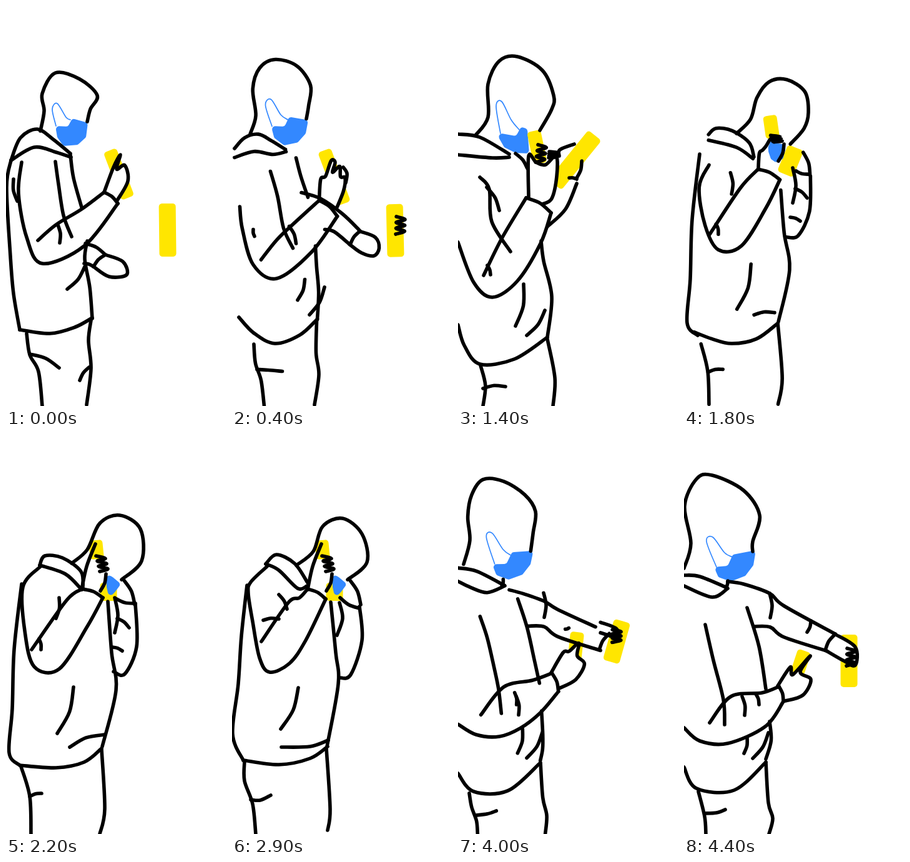
Animation of 352x640 px, one loop 4500 ms. Source, as an HTML page with a canvas:

```html
<!DOCTYPE html>
<html lang="en">
<head>
<meta charset="utf-8">
<title>Taking the strip</title>
<style>
html, body { margin: 0; width: 100%; height: 100%; overflow: hidden; background: #fff; }
canvas { display: block; width: 352px; height: 640px; }
</style>
</head>
<body>
<canvas id="stage" width="352" height="640"></canvas>
<script>
const ctx = document.getElementById('stage').getContext('2d');
const LOOP = 4500, STEP = 100;
const BLUE = '#3388ff', YELLOW = '#ffe600';

// Key points of each stroke. Two points make a slightly bowed line,
// strips are given by their axis and fingers by the line they zigzag along.
const stand = {
  head: '55,200 61,168 58,140 79,107 118,117 146,143 135,165 130,185',
  mask: '79,192 99,193 106,180 131,187 128,210 115,222 92,224 82,210',
  strap: '80,192 74,165 82,156 96,178 103,182',
  hoodTop: '8,247 23,211 50,197 75,213 103,236',
  hoodLow: '8,247 45,226 80,234 104,242',
  back: '8,247 1,290 7,400 12,460 22,518',
  hem: '22,518 70,524 110,514 138,499',
  chest: '103,238 108,275 121,322',
  front: '130,376 126,405 134,450 138,500',
  legL: '33,524 38,558 52,585 58,640',
  legFold: '38,557 85,579',
  legR: '136,503 132,535 136,580 129,638',
  kneeFold: '118,599 133,578',
  sleeveOut: '25,250 20,300 33,370 58,412 125,384 179,316',
  sleeveIn: '157,298 121,325 80,350 51,375',
  foldA: '79,249 84,285 92,335 105,369',
  foldB: '83,350 86,379',
  foldC: '18,312 12,277',
  handA: '157,298 172,258 183,238 177,261 190,255 195,280 178,311',
  stripA: '166,231 195,307',
  armTop: '127,380 159,398',
  armLow: '125,412 140,417',
  cuffB: '140,417 159,398',
  handB: '159,398 187,409 193,430 165,433 140,417',
  bodyFold: '126,417 98,453',
  stripB: '258,316 259,401'
};
const reach = {
  head: '3,210 16,178 8,120 18,78 48,61 90,75 113,118 107,160 108,176',
  mask: '46,192 69,193 77,175 113,178 108,198 95,215 75,222 53,212',
  strap: '48,193 33,152 43,143 60,170 76,182',
  hoodTop: '0,209 30,212 68,223',
  hoodLow: '0,238 52,241 69,224',
  hem: '0,478 18,525 55,559 105,540 135,503',
  front: '137,392 148,445 135,503',
  chest: '102,248 122,290',
  legL: '37,558 37,585 45,640',
  legFold: '42,606 54,597 76,590',
  legR: '135,505 137,575 142,600 135,638',
  sleeveOut: '0,392 13,413 35,458 85,460 130,403 158,357',
  sleeveIn: '122,324 80,370 42,437',
  foldA: '44,280 62,325 73,376 90,406',
  foldB: '100,355 119,381',
  foldC: '54,425 56,438',
  handA: '122,325 121,272 131,277 142,243 147,262 143,278 159,256 155,280 168,268 171,295 158,333',
  stripA: '129,231 164,325',
  armTop: '95,217 145,230 205,273 250,321',
  armLow: '172,303 195,308 238,347',
  cuffB: '238,347 250,323',
  handB: '250,323 279,334 280,352 275,368 256,361 238,347',
  fingersB: '270,337 269,365',
  shoulder: '178,258 184,268 182,283',
  bodyFold: '107,458 112,488',
  bodyFoldB: '148,450 124,494',
  stripB: '262,318 265,402'
};
const lift = {
  head: '28,207 48,178 48,125 66,88 95,81 135,103 153,143 150,165 131,199',
  mask: '64,203 93,208 101,193 111,197 114,236 92,235 74,226 66,212',
  strap: '68,204 61,160 70,153 85,182 98,198',
  neck: '92,236 111,260',
  hoodTop: '0,205 35,210 82,237',
  hoodLow: '0,238 55,243 82,242',
  hem: '0,510 10,543 35,573 90,565 143,530',
  front: '133,376 137,408 150,465 143,530',
  legL: '36,575 40,640',
  legFold: '40,612 76,609',
  legR: '143,533 155,595 152,640',
  sleeveOut: '0,378 25,442 55,466 95,440 132,380 149,331',
  sleeveIn: '109,307 70,372 41,431',
  foldA: '35,274 50,293 54,345 84,393',
  foldB: '46,290 66,327',
  foldC: '47,415 52,430',
  handA: '113,306 113,240 125,250 140,254 157,240 158,272 150,308 135,317',
  fingersA: '131,250 135,222',
  stripA: '121,200 132,252',
  armLow: '190,284 172,325 143,353',
  cuffB: '178,275 190,277',
  handB: '162,240 163,230 186,221',
  thumbB: '198,248 190,275',
  fingersB: '153,233 152,243',
  bodyFold: '105,445 92,512',
  bodyFoldB: '139,487 110,527',
  stripB: '219,207 155,286'
};
const look = {
  head: '105,207 130,185 150,143 182,130 215,152 217,203 185,233',
  mask: '160,222 172,230 184,240 175,252 165,263 161,245',
  hoodTop: '54,210 62,195 90,198 120,220 123,247',
  hoodLow: '54,210 95,224 121,249',
  back: '25,240 13,345 10,440 5,510 22,530',
  hem: '22,530 80,534 125,525 153,503',
  front: '163,268 169,350 176,410 154,500',
  legL: '24,532 38,580 40,640',
  legFold: '38,580 57,575',
  legR: '153,505 158,600 150,640',
  sleeveOut: '55,212 27,245 30,315 45,372 85,376 130,308 155,262',
  sleeveIn: '122,248 97,266 41,345',
  foldB: '85,262 80,295',
  foldC: '53,328 56,345',
  handA: '121,249 129,212 143,176',
  thumbA: '160,224 151,251',
  fingersA: '151,195 157,220',
  stripA: '143,170 146,200',
  thumbB: '188,233 206,273',
  cuffB: '207,271 175,263',
  armLow: '207,272 209,340 190,384 172,380',
  armFoldA: '174,262 174,318',
  armFoldB: '178,295 197,310',
  armFoldC: '170,341 186,347',
  bodyFold: '108,405 82,479',
  bodyFoldB: '102,501 158,481',
  stripB: '164,238 164,267'
};
const lookOn = {
  ...look,
  head: '103,210 130,188 145,148 177,135 208,160 216,205 185,233',
  hoodTop: '54,208 71,193 100,207 121,238',
  hoodLow: '54,208 75,218 105,247 120,243',
  back: '24,242 15,324 10,400 1,480 18,522',
  hem: '18,522 75,529 125,519 153,500',
  front: '158,269 166,350 170,400 152,500',
  legL: '20,524 20,555 33,592 38,640',
  legFold: '30,585 45,586 62,578',
  legR: '151,503 157,600 153,634',
  sleeveOut: '56,212 30,237 26,255 33,300 44,358 60,381 92,367 118,330 150,264',
  sleeveIn: '121,248 108,262 90,270 47,332',
  foldB: '75,257 88,280',
  foldC: '50,298 75,296',
  cuffB: '204,279 173,262',
  armLow: '204,276 208,330 190,385 172,390',
  armFoldA: '172,270 177,295 168,322',
  armFoldB: '',
  armFoldC: '',
  bodyFold: '106,406 78,472',
  bodyFoldB: '79,501 125,500 154,490'
};
const lower = {
  head: '27,197 37,155 36,115 55,84 78,77 105,86 140,118 147,140 130,172 129,188',
  mask: '68,201 92,204 103,184 132,190 126,208 113,223 92,229 74,221',
  strap: '72,200 64,153 72,148 87,177 101,192',
  neck: '77,230 77,238',
  hoodTop: '0,193 40,205 85,237',
  hoodLow: '0,223 12,233 45,244 85,237',
  chest: '85,238 103,288 119,360 129,382',
  hem: '0,565 35,584 80,574 133,530',
  front: '127,412 137,485 140,515 133,530',
  legL: '8,582 8,603 22,625 24,640',
  legFold: '22,618 52,609',
  legR: '134,530 136,560 147,640',
  sleeveOut: '0,455 25,462 60,464 90,455 125,419 164,382',
  sleeveIn: '147,342 108,356 70,376 28,426',
  foldA: '38,268 54,290 67,350 69,378 78,413',
  foldC: '42,412 41,435',
  handA: '147,342 165,305 185,275 176,296 200,304 201,320 185,345 161,369',
  fingersA: '194,304 193,324',
  stripA: '187,259 193,356',
  armTop: '106,278 128,292 150,297 176,288',
  armFoldA: '126,335 121,305',
  armFoldB: '152,332 141,308',
  handB: '202,266 220,246 239,252 228,262',
  fingersB: '226,255 227,260',
  bodyFold: '108,448 94,512',
  stripB: '261,258 206,286'
};
const reachAgain = {
  head: '0,215 11,175 1,115 20,72 45,66 95,90 121,130 110,172 110,188',
  mask: '48,213 70,211 78,193 115,186 111,210 98,227 75,236 55,229',
  strap: '52,213 36,172 46,165 65,190 78,197',
  neck: '70,235 67,246',
  hoodTop: '0,226 25,228 69,246',
  hoodLow: '0,243 45,261 70,247',
  chest: '101,278 120,340 131,408',
  hem: '0,533 20,567 80,570 131,525',
  front: '137,460 131,520',
  legL: '23,572 33,612 35,640',
  legFold: '33,607 52,606 66,601',
  legR: '131,525 135,590 142,615 136,640',
  sleeveOut: '0,470 25,491 70,495 130,468 159,428',
  sleeveIn: '152,404 125,414 75,420 41,462',
  foldA: '34,305 47,362 63,425 65,465',
  foldB: '93,420 97,450',
  foldC: '115,416 120,433',
  handA: '150,403 170,373 174,385 202,355 186,381 203,393 190,418 162,427',
  stripA: '193,347 181,383',
  armTop: '70,236 95,240 137,255 160,275 242,320',
  armLow: '112,308 138,309 160,325 228,347',
  cuffB: '226,346 242,320',
  handB: '241,320 274,341 274,370 256,363 228,347',
  fingersB: '268,343 267,371',
  shoulder: '137,255 138,294',
  armFoldA: '203,299 197,317',
  bodyFold: '101,485 96,511',
  bodyFoldB: '135,478 110,519',
  stripB: '264,321 264,405'
};

const parse = s => s && s.split(' ').map(p => p.split(',').map(Number));
for (const pose of [stand, reach, lift, look, lookOn, lower, reachAgain]) {
  for (const name in pose) pose[name] = parse(pose[name]);
  pose.cuffA = [pose.sleeveIn[0], pose.sleeveOut[pose.sleeveOut.length - 1]];
}

// time, pose, vertical shift
const KEYS = [
  [0, stand, 0], [800, reach, 0], [1100, reach, -6], [1400, lift, 0],
  [1950, look, -4], [2200, look, 0], [2900, lookOn, 0], [3000, lookOn, 0],
  [3600, lower, 0], [4200, reachAgain, -1], [4400, reachAgain, 0]
];

const mix = (a, b, k) => a + (b - a) * k;
const between = (p, q, k) => [mix(p[0], q[0], k), mix(p[1], q[1], k)];

function resample(pts, n) {
  const at = [0];
  for (let i = 1; i < pts.length; i++)
    at.push(at[i - 1] + Math.hypot(pts[i][0] - pts[i - 1][0], pts[i][1] - pts[i - 1][1]));
  const out = [];
  for (let j = 0, i = 1; j < n; j++) {
    const d = at[at.length - 1] * j / (n - 1);
    while (i < pts.length - 1 && at[i] < d) i++;
    out.push(between(pts[i - 1], pts[i], (d - at[i - 1]) / (at[i] - at[i - 1] || 1)));
  }
  return out;
}

function blend(a, b, k) {
  if (!a || !b) return k < 0.5 ? a : b;
  if (k === 0) return a;
  if (k === 1) return b;
  const n = Math.max(a.length, b.length);
  if (a.length < n) a = resample(a, n);
  if (b.length < n) b = resample(b, n);
  return a.map((p, i) => between(p, b[i], k));
}

// Point beside the line p-q at fraction k, pushed out by d
function beside(p, q, k, d) {
  const [x, y] = between(p, q, k), dx = q[0] - p[0], dy = q[1] - p[1];
  const len = Math.hypot(dx, dy) || 1;
  return [x + dy / len * d, y - dx / len * d];
}

function bow([p, q]) {
  const len = Math.hypot(q[0] - p[0], q[1] - p[1]);
  return [p, beside(p, q, 0.5, len * 0.09), q];
}

function zigzag([p, q]) {
  const out = [];
  for (let i = 0; i <= 6; i++) {
    const [x, y] = between(p, q, i / 6);
    out.push([x + (i % 2 ? 7 : -7), y]);
  }
  return out;
}

function curve(pts, width = 5.6, color = '#000', fill) {
  if (pts.length === 2) pts = bow(pts);
  const at = i => pts[Math.max(0, Math.min(pts.length - 1, i))];
  ctx.beginPath();
  ctx.moveTo(...pts[0]);
  for (let i = 0; i < pts.length - 1; i++) {
    const [p, a, b, q] = [at(i - 1), at(i), at(i + 1), at(i + 2)];
    ctx.bezierCurveTo(a[0] + (b[0] - p[0]) / 6, a[1] + (b[1] - p[1]) / 6,
      b[0] - (q[0] - a[0]) / 6, b[1] - (q[1] - a[1]) / 6, b[0], b[1]);
  }
  if (fill) {
    ctx.fillStyle = fill;
    ctx.fill();
  }
  ctx.lineWidth = width;
  ctx.strokeStyle = color;
  ctx.stroke();
}

function patch(pts, color) {
  const n = pts.length;
  ctx.beginPath();
  ctx.moveTo(...between(pts[n - 1], pts[0], 0.5));
  pts.forEach((p, i) => ctx.arcTo(...p, ...pts[(i + 1) % n], 5));
  ctx.closePath();
  ctx.fillStyle = color;
  ctx.fill();
}

function strip([p, q], width) {
  const h = width / 2;
  patch([beside(p, q, 0, h), beside(p, q, 1, h), beside(p, q, 1, -h), beside(p, q, 0, -h)], YELLOW);
}

// Painted in this order, below all other lines
const LAYERS = {
  stripB: pts => strip(pts, 27),
  handB: pts => curve(pts, 5.6, '#000', '#fff'),
  mask: pts => patch(pts, BLUE),
  stripA: pts => strip(pts, 22),
  handA: pts => curve(pts, 5.6, '#000', '#fff'),
  strap: pts => curve(pts, 1.7, BLUE)
};

function draw(t) {
  let i = 0;
  while (i < KEYS.length - 2 && t >= KEYS[i + 1][0]) i++;
  const [t0, a, ay] = KEYS[i], [t1, b, by] = KEYS[i + 1];
  const k = Math.min(1, (t - t0) / (t1 - t0));

  ctx.setTransform(1, 0, 0, 1, 0, 0);
  ctx.fillStyle = '#fff';
  ctx.fillRect(0, 0, 352, 640);
  ctx.translate(0, mix(ay, by, k));
  ctx.lineCap = ctx.lineJoin = 'round';

  for (const name of new Set([...Object.keys(LAYERS), ...Object.keys(a), ...Object.keys(b)])) {
    const pts = blend(a[name], b[name], k);
    if (!pts) continue;
    if (LAYERS[name]) LAYERS[name](pts);
    else curve(name.startsWith('fingers') ? zigzag(pts) : pts);
  }
}

const start = performance.now();
function tick() {
  const t = (performance.now() - start) % LOOP;
  draw(Math.floor(t / STEP) * STEP);
  requestAnimationFrame(tick);
}
tick();
</script>
</body>
</html>
```
